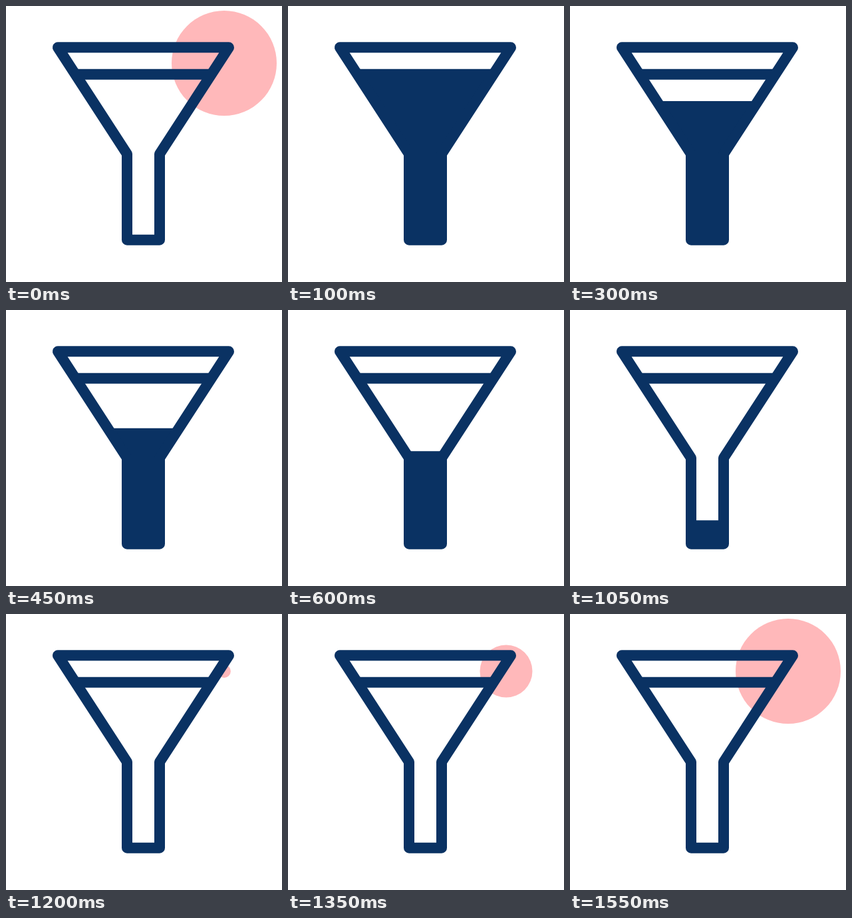
Animation of 415x415 px, one loop 1.6 s. Source, as an HTML page:

```html
<!DOCTYPE html>
<html lang="en">
<head>
<meta charset="utf-8">
<title>Funnel</title>
<style>
  html, body { margin: 0; width: 100%; height: 100%; overflow: hidden; background: #fff; }
  svg { display: block; width: 100vw; height: 100vh; }
</style>
</head>
<body>
<svg viewBox="0 0 415 415">
  <defs>
    <clipPath id="level"><rect id="mask" width="415" height="415"/></clipPath>
  </defs>
  <circle id="dot" cx="328" cy="86" r="79" fill="#ffb8ba"/>
  <path id="liquid" d="M78 62.3H335L231 222.5V351.7H182V222.5Z" fill="#0a3263" clip-path="url(#level)"/>
  <g fill="none" stroke="#0a3263" stroke-width="16" stroke-linejoin="round" stroke-linecap="round">
    <path d="M78 62.3H335L231 222.5V351.7H182V222.5Z"/>
    <path d="M106 102.7H307"/>
  </g>
</svg>
<script>
  const LOOP = 1600, STEP = 50;
  const DRAIN_START = 100, DRAIN_END = 1150;
  const RADIUS = 79, GROW_TIME = 400;
  const [dot, liquid, mask] = ['dot', 'liquid', 'mask'].map(id => document.getElementById(id));

  function draw(time) {
    const t = Math.floor((time % LOOP) / STEP) * STEP;
    const draining = t >= DRAIN_START && t <= DRAIN_END;

    liquid.style.display = draining ? '' : 'none';
    mask.setAttribute('y', 96.8 + 0.231 * (t - DRAIN_START));

    const grown = t < DRAIN_START ? 1 : Math.max(0, (t - DRAIN_END) / GROW_TIME);
    dot.setAttribute('r', RADIUS * Math.min(1, grown));
  }

  const start = performance.now();
  function tick() {
    draw(performance.now() - start);
    requestAnimationFrame(tick);
  }
  tick();
</script>
</body>
</html>
```
